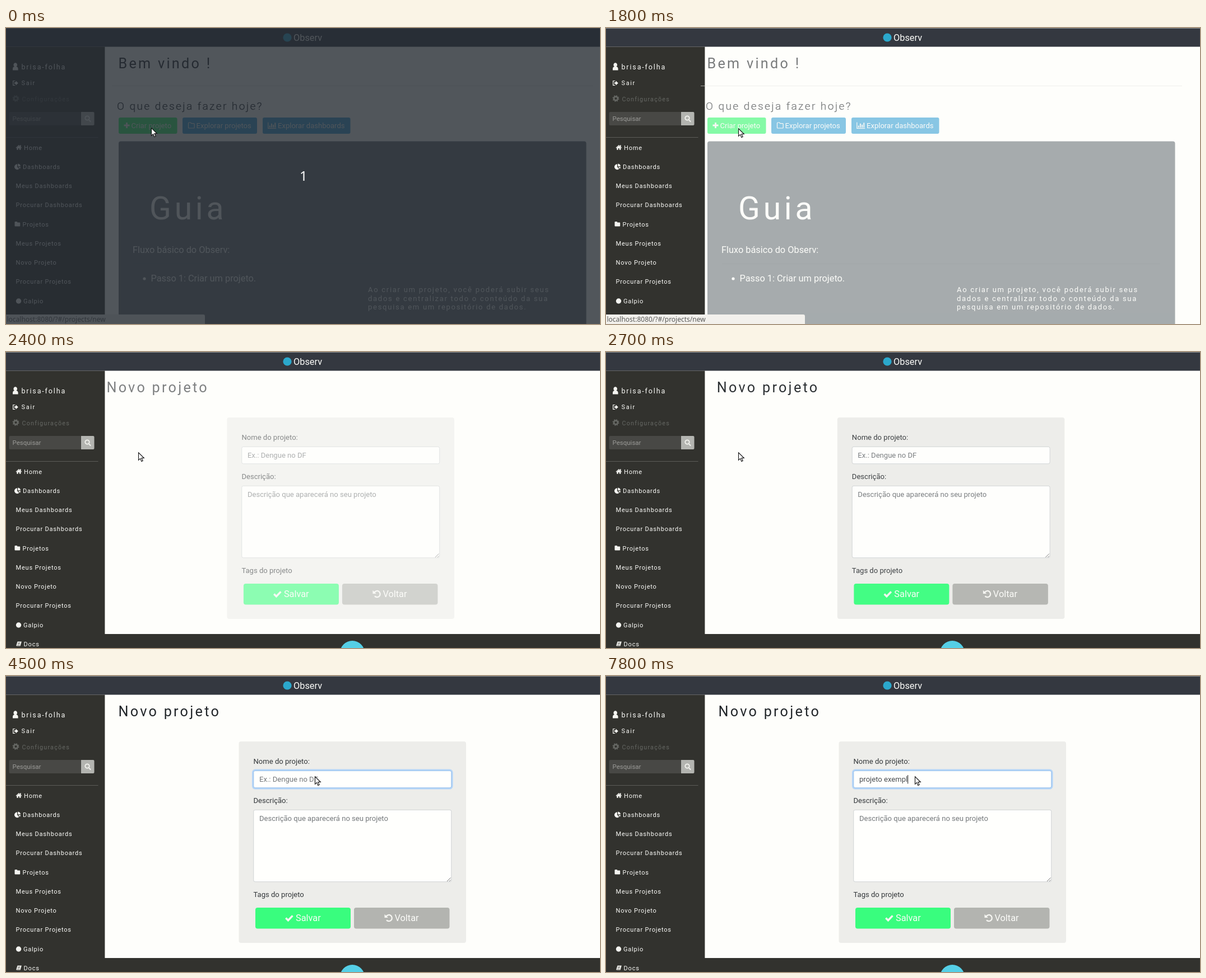
An HTML page that plays this animation: 1060x529 px, repeating every 8000 ms.

```html
<!DOCTYPE html>
<html lang="pt-BR">
<head>
<meta charset="utf-8">
<title>Observ</title>
<style>
html, body { margin: 0; width: 100%; height: 100%; overflow: hidden; background: #fefefb; }
svg { display: block; width: 1060px; height: 529px; }
text { font: 13.07px Roboto, sans-serif; fill: #212529; white-space: pre; }
.lead { font-size: 16.34px; }
.title { font-size: 25.2px; letter-spacing: 3.27px; }
.ask { font-size: 19.1px; font-weight: 300; letter-spacing: 2.4px; stroke: #212529; stroke-width: .25px; }
.guide { font-size: 57px; letter-spacing: 5.8px; }
.note { letter-spacing: 1.7px; }
.menu { font-size: 11px; letter-spacing: .82px; }
.side text, .light text, text.light { fill: #fbfbf8; }
.side text.dim { fill: #656763; }
.side .search { fill: #9b9b98; font-size: 11.5px; }
.hint { fill: #74787b; }
.label { fill: #33373a; }
.icon { fill: #f5f5f1; }
.line { fill: none; stroke: #f5f5f1; stroke-width: 1.2; }
.status { font: 12px "Noto Sans", sans-serif; fill: #5a5a58; }
.count { font: 24px "Noto Sans", sans-serif; fill: #fff; }
</style>
</head>
<body>
<svg viewBox="0 0 1060 529">
  <rect width="1060" height="529" fill="#fefefb"/>

  <g id="footer">
    <rect x="176" y="504" width="884" height="25" fill="#32322e"/>
    <circle cx="618" cy="538" r="22" fill="#55cfe6"/>
  </g>

  <rect width="1060" height="33.5" fill="#343840"/>
  <rect width="1060" height="1" fill="#8d9194"/>
  <circle cx="502" cy="17" r="7.6" fill="#2ba8cc"/>
  <text class="lead light" x="513" y="23">Observ</text>

  <g class="side">
    <rect y="33.5" width="176.4" height="495.5" fill="#32322e"/>
    <g class="icon">
      <path d="M12 75.500V73q0-3.500 3-4a3.300 3.700 0 1 1 3.400 0q3.200.5 3.200 4v2.500z"/>
      <path d="M15 97h2.500v-2.800l4.300 4.200-4.300 4.200v-2.800H15z"/>
    </g>
    <path class="line" d="M16 94.500h-3.300v7.800H16"/>
    <g fill="none" stroke="#656763">
      <circle cx="17.500" cy="126" r="3.400" stroke-width="2.600"/>
      <circle cx="17.500" cy="126" r="5" stroke-width="1.800" stroke-dasharray="2 1.927"/>
    </g>
    <text x="27.500" y="73.500" style="font-size:12.5px;letter-spacing:1.85px">brisa-folha</text>
    <text x="27.500" y="102.300" class="menu" style="letter-spacing:1.63px">Sair</text>
    <text x="28.500" y="131" class="dim" style="font-size:10.8px;letter-spacing:1.2px">Configurações</text>
    <rect x="5.500" y="150" width="129" height="24" rx="2" fill="#484845"/>
    <path d="M134 150h21.500q2 0 2 2v20q0 2-2 2H134z" fill="#b3b4b0"/>
    <text x="11.500" y="166" class="search">Pesquisar</text>
    <path class="line" style="stroke-width:1.8" d="M148.200 164.500l3 3"/>
    <circle class="line" cx="145" cy="161" r="3.700" style="stroke-width:1.8"/>
    <path d="M0 195.500H164.500" stroke="#5c5c58"/>
    <g id="menu"></g>
    <g class="icon">
      <path d="M17.500 214l5.300-5 2.200 2v-1.800h1.600v3.200l1.700 1.600-.8.800-4.700-4.200-4.500 4.200z"/>
      <path d="M19.300 213.800l3.500-3.100 3.600 3.100v3.900h-2.600v-2.800h-2v2.800h-2.500z"/>
      <path d="M20 248.200l3.500 3.600a5 5 0 1 1-3.500-8.600z"/>
      <path d="M21.200 247.200v-4.800a4.800 4.800 0 0 1 4.700 4.800zM21.800 248.400h4.200q0 1.800-1.300 3.100z"/>
      <path d="M15.500 347q0-1 1-1h2.700q1 0 1 1v.5h4q1 0 1 1v5q0 1-1 1h-7.700q-1 0-1-1z"/>
      <circle cx="22.500" cy="488" r="4.700"/>
      <path d="M20.500 517.500h7.300l-2.300 8h-6.200q-1 0-1-1z"/>
    </g>
    <path d="M21.300 519.800h4M20.800 521.500h4M19.800 524h5" stroke="#32322e" stroke-width=".7"/>
  </g>

  <g id="home">
    <text class="title" x="200.500" y="72">Bem vindo !</text>
    <path d="M189 103.500H1048" stroke="#e8e8e1"/>
    <text class="ask" x="198" y="146">O que deseja fazer hoje?</text>
    <rect x="201" y="160" width="104.500" height="29" rx="3" fill="#36f86e"/>
    <g fill="#3aa1d6">
      <rect x="315" y="160" width="133" height="29" rx="3"/>
      <rect x="458" y="160" width="156.500" height="29" rx="3"/>
    </g>
    <path d="M215.500 169v10M210.500 174h10" stroke="#f5f5f1" stroke-width="2.800"/>
    <path class="line" d="M325.500 170q0-1 1-1h3l1.500 1.700h4.200q1 0 1 1v6.300q0 1-1 1h-8.700q-1 0-1-1z"/>
    <path class="line" d="M467.800 168.500v10.800h14.400"/>
    <path class="line" style="stroke-width:1.9" d="M470.700 177.800v-3.300M473.900 177.800v-7M477.100 177.800v-5M480.300 177.800v-8.500"/>
    <g class="light">
      <text x="223.500" y="179">Criar projeto</text>
      <text x="339.500" y="179">Explorar projetos</text>
      <text x="485" y="179">Explorar dashboards</text>
    </g>
    <rect x="201" y="202.500" width="834.500" height="340" rx="4" fill="#6c757a"/>
    <path d="M227 421.500H1009" stroke="#656d72"/>
    <g class="light">
      <text class="guide" x="256" y="342">Guia</text>
      <text class="lead" x="226" y="401.500">Fluxo básico do Observ:</text>
      <circle cx="247" cy="448" r="2.600" fill="#fbfbf8"/>
      <text class="lead" x="258.500" y="453">Passo 1: Criar um projeto.</text>
      <text class="note" x="646" y="472">Ao criar um projeto, você poderá subir seus</text>
      <text class="note" x="646" y="487.500">dados e centralizar todo o conteúdo da sua</text>
      <text class="note" x="646" y="503">pesquisa em um repositório de dados.</text>
    </g>
  </g>

  <g id="form">
    <text class="title" x="200.500" y="72">Novo projeto</text>
    <rect x="415.500" y="117" width="405.500" height="360" rx="4" fill="#ededea"/>
    <text class="label" x="441.500" y="157">Nome do projeto:</text>
    <rect id="ring" x="440.300" y="167.800" width="356" height="33.500" rx="4.500" fill="none" stroke="#b5d5f8" stroke-width="2.600"/>
    <rect id="field" x="441.800" y="169.300" width="353" height="30.500" rx="3" fill="#fffffd" stroke="#cfd2d4"/>
    <text id="typed" x="452" y="188.800"></text>
    <path id="caret" d="M0 177V192.500" stroke="#222"/>
    <text class="label" x="441.500" y="227">Descrição:</text>
    <rect x="441.800" y="239.300" width="353" height="128.500" rx="3" fill="#fffffd" stroke="#cfd2d4"/>
    <path d="M787 367l6.500-6.500M791 367l2.500-2.500" stroke="#666" stroke-width=".9"/>
    <text class="hint" x="452" y="259">Descrição que aparecerá no seu projeto</text>
    <text class="label" x="441.500" y="395.300">Tags do projeto</text>
    <rect x="445" y="414" width="170" height="37.500" rx="4" fill="#39fd7e"/>
    <rect x="621" y="414" width="170.500" height="37.500" rx="4" fill="#b3b4b0"/>
    <path class="line" style="stroke-width:3.4" d="M499.300 432.500l4.200 4.200 8-8.300"/>
    <path class="line" style="stroke-width:2.300" d="M678.500 429.500a5.600 5.600 0 1 1 .5 6.800"/>
    <path class="icon" d="M675.500 425.800v6.300h6.300z"/>
    <g class="light">
      <text class="lead" x="517" y="438.400">Salvar</text>
      <text class="lead" x="693.500" y="438.400">Voltar</text>
    </g>
  </g>

  <g id="status">
    <path d="M0 512h352q3 0 3 3V529H0z" fill="#f2f0ec"/>
    <text class="status" x="1.500" y="525">localhost:8080/?#/projects/new</text>
  </g>

  <g id="countdown">
    <rect width="1060" height="529" fill="#262c34" opacity=".8"/>
    <text class="count" x="524" y="273">1</text>
  </g>

  <path id="cursor" d="M.5.8V14.300l3.100-2.900 2.200 5.100 2.300-1-2.200-5h4.400z" fill="#fff" stroke="#111" stroke-width="1.100"/>
</svg>
<script>
const LOOP = 8000, TICK = 100, SHIFT = 50;
const el = id => document.getElementById(id);
const show = (id, on) => { el(id).style.display = on ? "" : "none"; };
const clamp = value => Math.min(1, Math.max(0, value));

// Menu rows are evenly spaced down the sidebar.
[["Home", 32], ["Dashboards", 30], ["Meus Dashboards", 17.5], ["Procurar Dashboards", 17.5],
 ["Projetos", 29.5], ["Meus Projetos", 17.5], ["Novo Projeto", 17.5], ["Procurar Projetos", 17.5],
 ["Galpio", 31], ["Docs", 31.5]].forEach(([label, x], row) => {
  const text = document.createElementNS("http://www.w3.org/2000/svg", "text");
  text.setAttribute("class", "menu");
  text.setAttribute("x", x);
  text.setAttribute("y", 217.5 + row * 34.28);
  text.textContent = label;
  el("menu").append(text);
});

// Time, then pointer tip.
const pointer = [
  [0, 259, 178], [600, 252, 180], [700, 244, 183], [800, 238, 184],
  [1000, 234, 185], [1100, 230, 185], [1200, 227, 184], [1400, 236, 179],
  [2900, 262, 182], [3000, 339, 165], [3200, 400, 154], [3300, 490, 160],
  [3400, 558, 173], [3900, 553, 177], [4000, 551, 179]
];
const phrase = "projeto exempl";
// Time, then number of letters typed.
const typing = [
  [0, 0], [5400, 1], [5500, 2], [5600, 3], [5900, 4], [6200, 5], [6300, 7],
  [6600, 8], [6800, 9], [7000, 10], [7200, 11], [7500, 12], [7700, 13], [7800, 14]
];
const at = (keys, t) => keys.filter(key => key[0] <= t).pop();

function slide(id, visible, presence) {
  show(id, visible);
  el(id).setAttribute("transform", `translate(${-SHIFT * (1 - presence)} 0)`);
  el(id).setAttribute("opacity", presence);
}

function draw(t) {
  show("countdown", t < 100);
  show("status", t < 2400);
  show("footer", t >= 2000);

  slide("home", t < 2000, 1 - clamp((t - 1700) / 250));
  slide("form", t >= 2300, 1 - (1 - clamp((t - 2200) / 800)) ** 3);

  const focused = t >= 3900;
  show("ring", focused);
  el("ring").setAttribute("opacity", t < 4000 ? .6 : 1);
  el("field").setAttribute("stroke", focused ? "#8fbdec" : "#cfd2d4");

  const count = at(typing, t)[1];
  const typed = el("typed");
  const value = count ? phrase.slice(0, count) : "Ex.: Dengue no DF";
  if (typed.textContent !== value) typed.textContent = value;
  typed.style.fill = count ? "#494d51" : "#74787b";
  show("caret", t >= 5100 || t >= 4000 && t < 4500);
  const width = count ? typed.getComputedTextLength() : 0;
  el("caret").setAttribute("transform", `translate(${452.5 + width} 0)`);

  const [, x, y] = at(pointer, t);
  el("cursor").setAttribute("transform", `translate(${x} ${y})`);
}

const start = performance.now();
function frame() {
  const elapsed = (performance.now() - start + 1) % LOOP;
  draw(Math.floor(elapsed / TICK) * TICK);
  requestAnimationFrame(frame);
}
frame();
</script>
</body>
</html>
```
